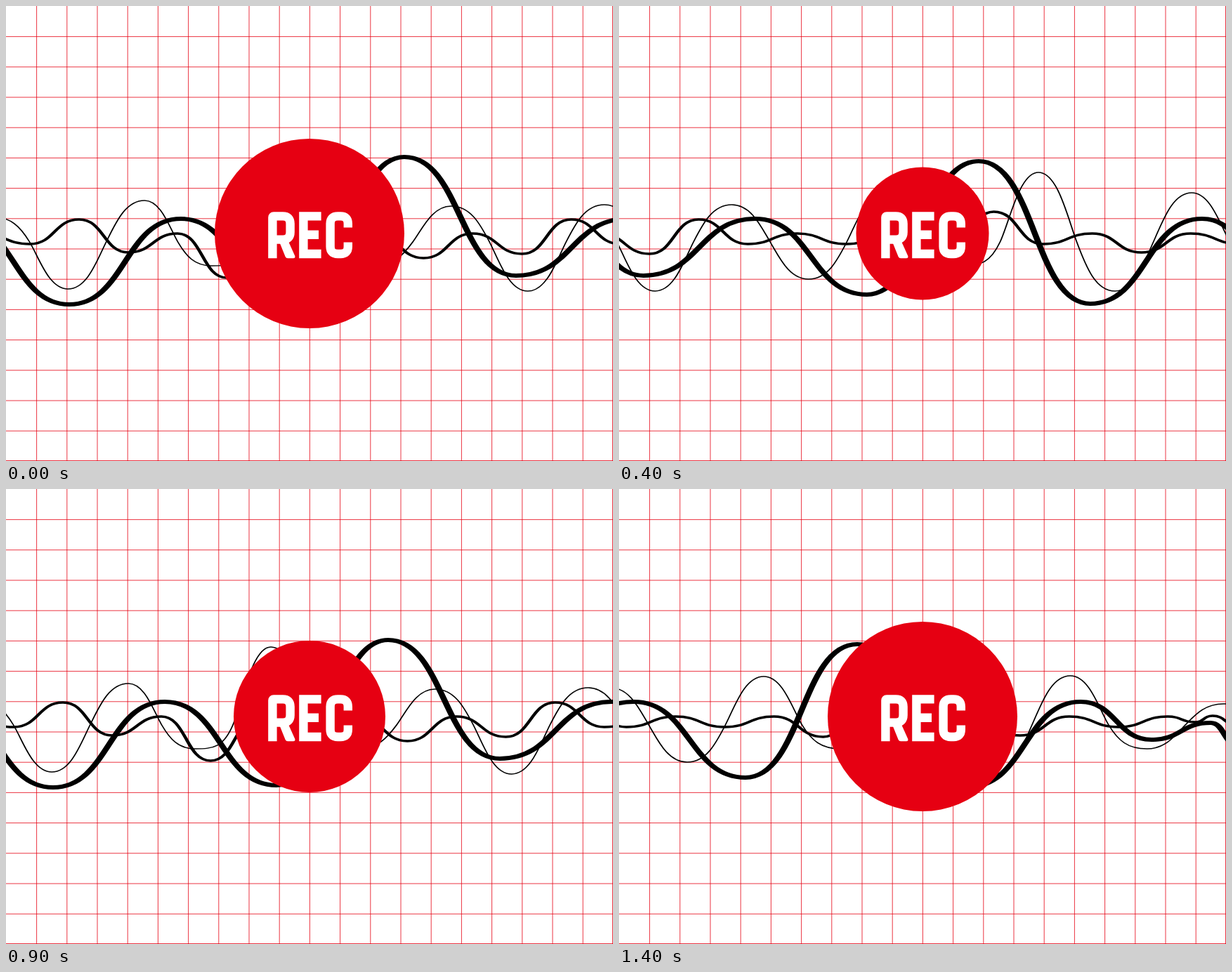
An HTML page for the animation above (1.5 s loop, 864 px wide and 648 px high).

```html
<!DOCTYPE html>
<html lang="en">
<head>
<meta charset="utf-8">
<title>Recording</title>
<style>
  html, body { margin: 0; width: 100%; height: 100%; overflow: hidden; background: #fff; }
  svg { display: block; width: 100vw; height: 100vh; }
</style>
</head>
<body>
<svg viewBox="0 0 864 648">
  <clipPath id="edge"><rect width="1728.5" height="648"/></clipPath>
  <rect width="864" height="648" fill="#fff"/>
  <path id="grid" fill="none" stroke="#e60012" stroke-width=".8"/>
  <g id="strip" fill="none" stroke="#000">
    <g id="tile" clip-path="url(#edge)"></g>
    <use href="#tile" x="1728"/>
  </g>
  <circle id="dot" cx="432" cy="324" r="135" fill="#e60012"/>
  <g role="img" aria-label="REC" fill="none" stroke="#fff" stroke-width="12.4">
    <path d="M379.4 359.3V301q0-1.6 1.6-1.6H394q10.6 0 10.6 10.6v12q0 10.6-10.6 10.6H380"/>
    <path d="M387.5 332h13l10.8 24q.7 3.3-2.3 3.3h-8q-2.4 0-3.4-2.3z" fill="#fff" stroke="none"/>
    <path d="M448.6 299.4H423.4V353H448.6M424 325.8H445"/>
    <path d="M486.8 315.5V310q0-10.6-10.6-10.6h-4q-10.6 0-10.6 10.6v32.4q0 10.6 10.6 10.6h4q10.6 0 10.6-10.6V336.5"/>
  </g>
</svg>
<script>
const $ = id => document.getElementById(id);
const TILE = 1728, STEP_MS = 100, COUNT = 15, RADIUS = 135, CELL = 43.2;

// Crests and troughs from x0 on, one every gap pixels; [x, y] places one freely.
// wide stretches the pen sideways; base is a level every swing passes halfway.
const waves = [
  { x0: -21, gap: 109.1, pen: 1.5, wide: 1.2, base: 336, swing: [
    300, 403, 277, [292, 370], [400, 225], 370, 285, 406, 283, 389, 267, 370, 237, 406, 266, 370, 306, 403] },
  { x0: -36, gap: 70.04, pen: 3.4, wide: 1.4, swing: [
    324, 339, 304, 351, 324, 387, 324, 339, 324, 359, 324, 353, 304,
    339, 324, 339, 324, 353, 293, 339, 324, 351, 324, 339, 324,
    [1684, 332], [1709, 323], [1745, 337]] },
  { x0: -69, gap: 159, pen: 6, wide: 1.45, swing: [
    303, 425, 303, 422, 215, 384, 303, 411, 221, 424, 303,
    [1622, 357], [1706, 333], [1745, 365]] }
];

function wavePath({ x0, gap, wide, base, swing }) {
  const pts = swing.map((s, i) => Array.isArray(s) ? s : [x0 + gap * i, s]);
  const at = (x, y) => `${(x / wide).toFixed(2)} ${y.toFixed(2)} `;
  let d = 'M' + at(...pts[0]);
  for (let i = 1; i < pts.length; i++) {
    const [ax, ay] = pts[i - 1], [bx, by] = pts[i];
    const mx = (ax + bx) / 2;
    if (base) {
      const hx = (bx - ax) / 8, hy = (by - ay) / 4.6;
      d += 'C' + at((ax + mx) / 2, ay) + at(mx - hx, base - hy) + at(mx, base)
         + 'C' + at(mx + hx, base + hy) + at((mx + bx) / 2, by) + at(bx, by);
    } else {
      d += 'C' + at(mx, ay) + at(mx, by) + at(bx, by);
    }
  }
  return d;
}

function gridPath() {
  const at = (i, end) => Math.min(i * CELL + 0.4, end - 0.5);
  let d = '';
  for (let i = 1; i <= 20; i++) d += `M${at(i, 864)} 0V648`;
  for (let i = 1; i <= 15; i++) d += `M0 ${at(i, 648)}H864`;
  return d;
}

// Linear interpolation through [step, value] keys.
function track(keys, n) {
  const i = Math.max(1, keys.findIndex(k => k[0] >= n));
  const [n0, v0] = keys[i - 1], [n1, v1] = keys[i];
  return v0 + (v1 - v0) * (n - n0) / (n1 - n0);
}

const scroll = [[0, 0], [5, 864], [6, 1219], [9, 1751], [11, 2094.5], [14, 2592]];
const size = [[0, 1], [2, 0.9], [4, 0.7], [6, 0.6], [9, 0.8], [11, 0.9], [12, 1], [14, 1]];

$('grid').setAttribute('d', gridPath());
$('tile').innerHTML = waves.map(w =>
  `<path d="${wavePath(w)}" stroke-width="${w.pen}" transform="scale(${w.wide} 1)"/>`).join('');

function draw(ms) {
  const n = Math.floor(ms / STEP_MS) % COUNT;
  $('strip').setAttribute('transform', `translate(${-(track(scroll, n) % TILE)} 0)`);
  $('dot').setAttribute('r', RADIUS * track(size, n));
}

let start = null;
function tick(now) {
  if (start === null) start = now;
  draw(Math.max(0, now - start));
  requestAnimationFrame(tick);
}
draw(0);
requestAnimationFrame(tick);
</script>
</body>
</html>
```
